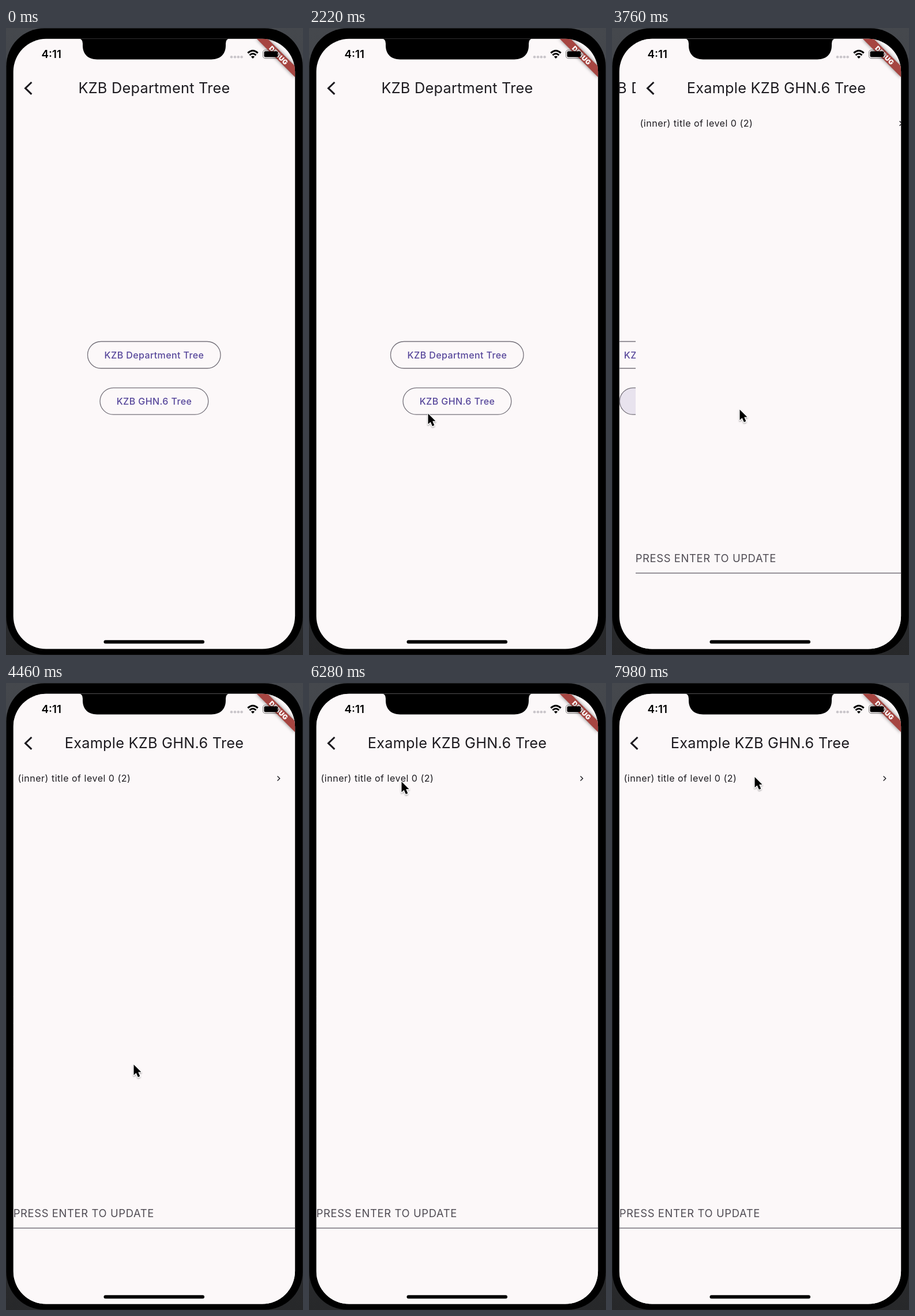
Recreate the animation shown at these times as an HTML page. Size 515x1087 px, loop 8000 ms.

```html
<!DOCTYPE html>
<html lang="en">
<head>
<meta charset="utf-8">
<title>Department tree demo</title>
<style>
  html, body { margin: 0; width: 100%; height: 100%; overflow: hidden; background: #000; }
  svg { display: block; width: 100vw; height: 100vh; font-family: Inter, "Open Sans", sans-serif; }
  .title { font-size: 25.3px; letter-spacing: .25px; fill: #1d1b20; text-anchor: middle; }
  .label { font-size: 16px; font-weight: 500; letter-spacing: .4px; fill: #57479b; text-anchor: middle; }
  .row { font-size: 16px; letter-spacing: .51px; fill: #1d1b20; }
  .hint { font-size: 18.4px; letter-spacing: .63px; fill: #504c54; }
  .line { fill: none; stroke: #75717a; stroke-width: 1.3; }
  .chevron { fill: none; stroke: #1d1b20; }
  .page { fill: #fcf8f9; }
</style>
</head>
<body>
<svg viewBox="0 0 515 1087" preserveAspectRatio="none">
  <defs>
    <clipPath id="screen"><rect x="12.7" y="18.8" width="488.4" height="1057.8" rx="57"/></clipPath>
    <clipPath id="pill"><rect x="163" y="624" width="188" height="46" rx="23"/></clipPath>
    <filter id="soft" x="-30%" y="-30%" width="160%" height="160%"><feGaussianBlur stdDeviation="3"/></filter>
    <filter id="drop" x="-50%" y="-50%" width="200%" height="200%">
      <feDropShadow dx="0" dy="1.5" stdDeviation="1.2" flood-opacity=".35"/>
    </filter>
    <linearGradient id="rim" x2="0" y2="1">
      <stop stop-color="#45484d"/><stop offset="1" stop-color="#27282a"/>
    </linearGradient>
    <path id="band" d="M434 18H453L502 67V86Z"/>
    <path id="back" class="chevron" stroke-width="3.1" d="M44.4 94L33.6 104.4L44.4 114.8"/>
  </defs>

  <rect width="515" height="1087" fill="url(#rim)"/>
  <rect x=".5" y=".5" width="514" height="1086" rx="66"/>

  <g clip-path="url(#screen)">
    <rect class="page" x="12" y="18" width="490" height="1060"/>
    <g id="home">
      <use href="#back"/>
      <text class="title" x="257" y="113">KZB Department Tree</text>
      <rect class="line" x="141.5" y="543.5" width="230.5" height="46.5" rx="23.2"/>
      <text class="label" x="257" y="572.5">KZB Department Tree</text>
      <g clip-path="url(#pill)" fill="#57479b">
        <rect id="glow" x="163" y="624" width="188" height="46"/>
        <circle id="ripple"/>
      </g>
      <rect class="line" x="163" y="623.8" width="187.8" height="46.4" rx="23.2"/>
      <text class="label" x="257" y="652.8">KZB GHN.6 Tree</text>
    </g>
    <g id="tree">
      <rect class="page" x="13" y="18" width="490" height="1060"/>
      <use href="#back"/>
      <text class="title" x="257" y="113">Example KZB GHN.6 Tree</text>
      <text class="row" x="20.5" y="171">(inner) title of level 0 (2)</text>
      <path class="chevron" stroke-width="1.4" d="M470.6 161.4L474.7 165.4L470.6 169.4"/>
      <text class="hint" x="12.7" y="925.6">PRESS ENTER TO UPDATE</text>
      <path class="line" d="M13 945H502"/>
    </g>
    <use href="#band" opacity=".5" filter="url(#soft)"/>
    <use href="#band" fill="#a64541"/>
    <text transform="translate(472.6 47.4) rotate(45)" y="4.2" text-anchor="middle" font-size="11.5" font-weight="900" letter-spacing=".2" fill="#fff">DEBUG</text>
    <path d="M126 18Q133 19 133 27V30C133 46 143 54.4 158 54.4H356C371 54.4 381 46 381 30V27Q381 19 388 18Z"/>

    <text x="61.6" y="52" font-size="18.8" font-weight="600">4:11</text>
    <g fill="#c9c5ca">
      <circle cx="391" cy="50.2" r="2.3"/><circle cx="397" cy="50.2" r="2.3"/>
      <circle cx="402.8" cy="50.2" r="2.3"/><circle cx="408.6" cy="50.2" r="2.3"/>
    </g>
    <g fill="none" stroke="#000" stroke-width="2.9">
      <path d="M419.3 43.4Q428 35.2 436.7 43.4"/>
      <path d="M422.5 47.1Q428 42 433.5 47.1"/>
    </g>
    <path d="M428 53L424.9 49.8Q428 47.2 431.1 49.8Z"/>
    <rect x="445.5" y="38.2" width="28" height="14.4" rx="4" fill="none" stroke="#000" stroke-opacity=".45" stroke-width="1.1"/>
    <rect x="447.5" y="40.2" width="24" height="10.4" rx="2.4"/>
    <path d="M475 43.2Q477.4 45.4 475 47.6Z" opacity=".5"/>
    <rect x="169.5" y="1061.2" width="174.5" height="6" rx="3"/>
  </g>

  <g id="cursor" filter="url(#drop)">
    <path d="M0 0V18.3L4.2 14.4L7.4 21.8L10.8 20.3L7.7 13.1H13Z" stroke="#fff" stroke-width="2.4" stroke-linejoin="round" paint-order="stroke"/>
  </g>
</svg>
<script>
const LOOP = 8000, TAP = 3341, PUSH = 838, WIDTH = 488;
const byId = id => document.getElementById(id);
const [home, tree, glow, ripple, cursor] = ["home", "tree", "glow", "ripple", "cursor"].map(byId);
const clamp = v => Math.min(1, Math.max(0, v));
const mix = (a, b, p) => a + (b - a) * p;

function bezier(x1, y1, x2, y2) {
  const at = (a, b, s) => 3 * (1 - s) * (1 - s) * s * a + 3 * (1 - s) * s * s * b + s * s * s;
  return x => {
    if (x <= 0 || x >= 1) return clamp(x);
    let lo = 0, hi = 1;
    for (let i = 0; i < 24; i++) {
      const mid = (lo + hi) / 2;
      if (at(x1, x2, mid) < x) lo = mid; else hi = mid;
    }
    return at(y1, y2, lo);
  };
}

const ease = bezier(.25, .1, .25, 1);
const glide = bezier(.42, 0, .58, 1);
const easeOld = bezier(.35, .91, .33, .97);
const head = bezier(.2828, .0444, .5455, .5702);
const tail = bezier(.2089, 1, .4345, .976);
const easeNew = u => u < .198 ? .541 * head(u / .198) : .541 + .459 * tail((u - .198) / .802);

// time, x, y of the pointer tip
const trail = [
  [1840, 2, 722], [2200, 206.5, 668.5], [2500, 206.5, 668.5], [2900, 221.5, 661.5],
  [5050, 221.5, 661.5], [5950, 160.5, 171], [6900, 160.5, 171], [7600, 247.5, 163], [LOOP, 247.5, 163]
];

function movePointer(t) {
  const i = trail.findIndex(k => k[0] > t);
  cursor.style.display = i > 0 ? "" : "none";
  if (i < 1) return;
  const [t0, x0, y0] = trail[i - 1], [t1, x1, y1] = trail[i];
  const p = glide((t - t0) / (t1 - t0));
  cursor.setAttribute("transform", `translate(${mix(x0, x1, p)} ${mix(y0, y1, p)})`);
}

function draw(t) {
  const u = clamp((t - TAP) / PUSH);
  home.setAttribute("transform", `translate(${-WIDTH / 3 * easeOld(u)} 0)`);
  tree.setAttribute("transform", `translate(${WIDTH * (1 - easeNew(u))} 0)`);

  const press = t < TAP ? clamp((t - TAP + 100) / 100) : 1 - clamp((t - TAP) / 336);
  glow.setAttribute("opacity", .13 * press);

  const grow = ease(clamp((t - TAP) / 378));
  const fade = 1 - clamp((t - TAP - 378) / 252);
  ripple.setAttribute("cx", mix(221, 257, grow));
  ripple.setAttribute("cy", mix(661, 647, grow));
  ripple.setAttribute("r", mix(29, 102, grow));
  ripple.setAttribute("opacity", .14 * fade * clamp((t - TAP + 60) / 100));

  movePointer(t);
}

const start = performance.now();
function tick() {
  draw((performance.now() - start) % LOOP);
  requestAnimationFrame(tick);
}
tick();
</script>
</body>
</html>
```
